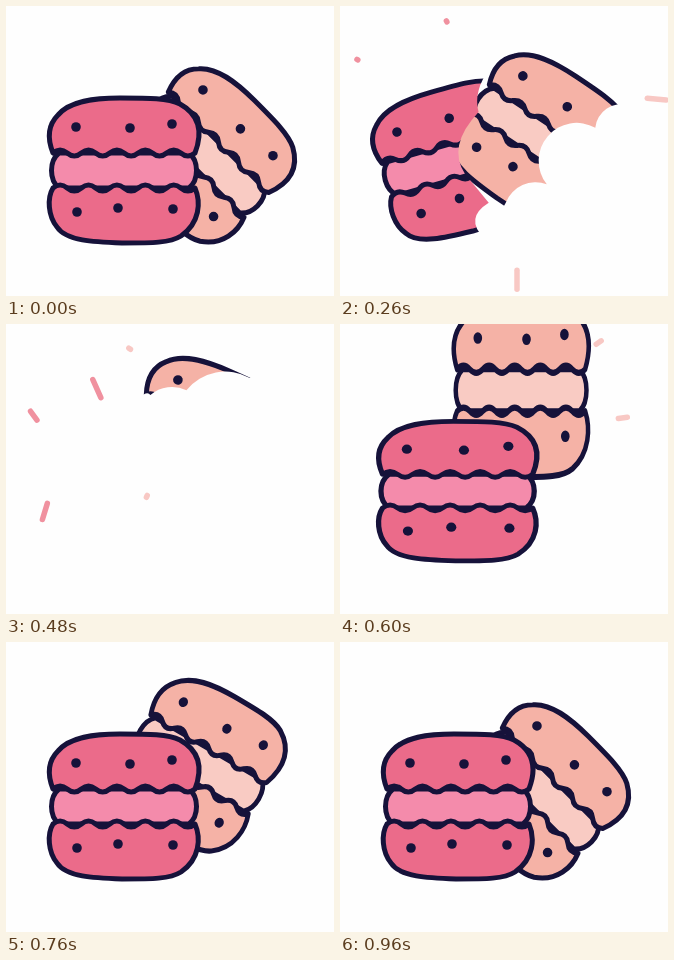
Write an HTML page that moves like this. It is 328 by 290 pixels and loops after 0.98 s.

```html
<!DOCTYPE html>
<html lang="en">
<head>
<meta charset="utf-8">
<title>Macarons</title>
<style>
  html, body { margin: 0; width: 100%; height: 100%; overflow: hidden; background: #fefefe; }
  svg { display: block; width: 328px; height: 290px; }
  .line { stroke: #16123a; stroke-width: 5; stroke-linejoin: round; }
  .dot { fill: #16123a; }
</style>
</head>
<body>
<svg id="stage" viewBox="0 0 328 290"></svg>
<script>
const LOOP = 980;
const BITES = [160, 340, 520];
const stage = document.getElementById('stage');

function add(parent, tag, attrs) {
  const node = document.createElementNS('http://www.w3.org/2000/svg', tag);
  for (const key in attrs) node.setAttribute(key, attrs[key]);
  return parent.appendChild(node);
}

// Shapes are drawn around the centre of a macaron.
const wave = 'q-7.1 6 -14.2 0' + 't-14.2 0'.repeat(9) + 'Z';
const TOP = 'M-71-17C-77-32-76-45-66-55C-54-69-30-72-4-72C25-72 44-72 56-66C76-55 79-38 71-17' + wave;
const BASE = 'M-71 18C-77 28-76 46-67 57C-58 71-30 72-2 73C28 73 46 73 57 66C76 53 77 32 71 18' + wave;
const CREAM = 'M-65-17C-75-9-75 10-65 18H65C75 10 75-9 65-17Z';
const DOTS = [[-48, -43], [6, -42], [48, -46], [-47, 42], [-6, 38], [49, 39]];

// Keys: time, x, y, turn, width scale, height scale.
const pinkKeys = [
  [0, 118, 164, 0, 1, 1],
  [130, 118, 164, 0, 1, 1],
  [260, 114.9, 154.3, -15.8, 1, 1],
  [340, 114.5, 152, -18, 1, 1],
  [560, 118, -95, 0, 0.9, 1.2],
  [580, 118, 95, 0, 0.92, 1.15],
  [600, 117.6, 166.5, 0, 1.055, 0.965],
  [620, 118, 168, 0, 1.08, 0.94],
  [660, 118, 162, 0, 0.98, 1.025],
  [700, 118, 165, 0, 1.01, 0.99],
  [740, 118, 164, 0, 1, 1],
  [LOOP, 118, 164, 0, 1, 1]
];
const peachKeys = [
  [0, 200.5, 148.3, 45, 1, 1],
  [130, 200.5, 148.3, 45, 1, 1],
  [260, 199, 132.4, 33.7, 1, 1],
  [340, 198.8, 128, 31, 1, 1],
  [480, 198.3, 114.8, 24, 1, 1],
  [520, 198, 113, 23, 1, 1],
  [580, 178, -60, 0, 0.88, 1.22],
  [600, 181, 63, 0, 0.9, 1.2],
  [640, 184, 130, 4, 1.08, 0.9],
  [700, 189, 115, 18, 0.97, 1.03],
  [760, 193.7, 121.8, 30, 0.945, 1.05],
  [820, 201, 151, 47, 1.05, 0.95],
  [880, 200.3, 147.5, 44.5, 0.99, 1.01],
  [930, 200.5, 148.3, 45, 1, 1],
  [LOOP, 200.5, 148.3, 45, 1, 1]
];

function macaron(id, shell, cream, keys, bites, gone, back) {
  const mask = add(stage, 'mask', {
    id, maskUnits: 'userSpaceOnUse', x: -100, y: -100, width: 200, height: 200
  });
  add(mask, 'rect', { x: -100, y: -100, width: 200, height: 200, fill: '#fff' });
  const holes = bites.map(d => add(mask, 'path', { d, fill: '#000' }));
  const body = add(stage, 'g', { mask: `url(#${id})` });
  add(body, 'path', { d: CREAM, fill: cream, class: 'line' });
  for (const d of [TOP, BASE]) add(body, 'path', { d, fill: shell, class: 'line' });
  for (const [cx, cy] of DOTS) add(body, 'circle', { cx, cy, r: 4.8, class: 'dot' });
  return { body, holes, keys, gone, back };
}

const peach = macaron('peach', '#f5b2a6', '#f9cbc3', peachKeys, [
  'M60-90L56-77A26 26 0 0 0 41-40A38 38 0 0 0 32 34A32 32 0 0 0 8 72L10 95H95V-90Z',
  'M-95-10H-76Q-72-21-67-18A33 33 0 0 1-36-37A50 50 0 0 1 17-74L30-95H95V95H-95Z'
], BITES[2], 565);
const pink = macaron('pink', '#eb6b8a', '#f48bab', pinkKeys, [
  'M60-80Q36-62 36-40Q-4-16 6 16L21 50Q-7 58 7 83L95 95V-95Z'
], BITES[1], 560);

// Crumbs: burst, x, y, heading, length, colour, all given at CHECK ms after the bite.
const CHECK = [100, 140, 80];
const LIFE = 200;
const ROSE = '#f0919f', PALE = '#f8c8c4';
const crumbs = [
  [0, 107, 16, -120, 1, ROSE],
  [0, 18, 54, -150, 1, ROSE],
  [0, 316, 93, 5, 19, PALE],
  [0, 177, 273, 90, 19, PALE],
  [1, 28, 92, -126, 11, ROSE],
  [1, 91, 65, -114, 20, ROSE],
  [1, 39, 187, 107, 17, ROSE],
  [1, 124, 25, -145, 2, PALE],
  [1, 141, 172, 115, 2, PALE],
  [2, 258, 19, -35, 6, PALE],
  [2, 282, 94, -8, 9, PALE]
].map(([burst, x, y, turn, size, stroke]) => ({
  burst, x, y, turn: turn * Math.PI / 180, size,
  node: add(stage, 'line', { stroke, 'stroke-linecap': 'round' })
}));

const easeOut = u => 1 - (1 - u) * (1 - u);

// Slope at a key; flat at turning points so that nothing overshoots.
function slope(keys, i, c) {
  const a = keys[i - 1], b = keys[i], d = keys[i + 1];
  if (!a || !d) return 0;
  const s = (b[c] - a[c]) / (b[0] - a[0]);
  const e = (d[c] - b[c]) / (d[0] - b[0]);
  return s * e > 0 ? 2 * s * e / (s + e) : 0;
}

function pose(keys, t) {
  let i = 0;
  while (i < keys.length - 2 && t >= keys[i + 1][0]) i++;
  const a = keys[i], b = keys[i + 1], span = b[0] - a[0], u = (t - a[0]) / span;
  return [1, 2, 3, 4, 5].map(c => {
    const rise = u * u * (3 - 2 * u);
    return a[c] + (b[c] - a[c]) * rise
      + span * u * (1 - u) * ((1 - u) * slope(keys, i, c) - u * slope(keys, i + 1, c));
  });
}

function show(node, on) {
  node.setAttribute('display', on ? 'inline' : 'none');
}

function drawMacaron(m, t) {
  const [x, y, turn, sx, sy] = pose(m.keys, t);
  m.body.setAttribute('transform', `translate(${x} ${y}) rotate(${turn}) scale(${sx} ${sy})`);
  show(m.body, t < m.gone || t >= m.back);
  m.holes.forEach((hole, i) => show(hole, t >= BITES[i] && t < m.gone));
}

function drawCrumb(c, t) {
  const u = (t - BITES[c.burst]) / LIFE, mark = CHECK[c.burst] / LIFE;
  const on = u > 0 && u < 1;
  show(c.node, on);
  if (!on) return;
  const far = 140 * (easeOut(u) - easeOut(mark));
  const half = c.size / 2 * Math.sin(Math.PI * u) / Math.sin(Math.PI * mark);
  const dx = Math.cos(c.turn), dy = Math.sin(c.turn);
  const ends = {
    x1: c.x + dx * (far - half), y1: c.y + dy * (far - half),
    x2: c.x + dx * (far + half), y2: c.y + dy * (far + half),
    'stroke-width': 5.5 * Math.min(1, u * 5, (1 - u) * 4)
  };
  for (const key in ends) c.node.setAttribute(key, ends[key]);
}

function draw(t) {
  drawMacaron(peach, t);
  drawMacaron(pink, t);
  for (const c of crumbs) drawCrumb(c, t);
}

const start = performance.now();
function tick() {
  draw((performance.now() - start) % LOOP);
  requestAnimationFrame(tick);
}
tick();
</script>
</body>
</html>
```
